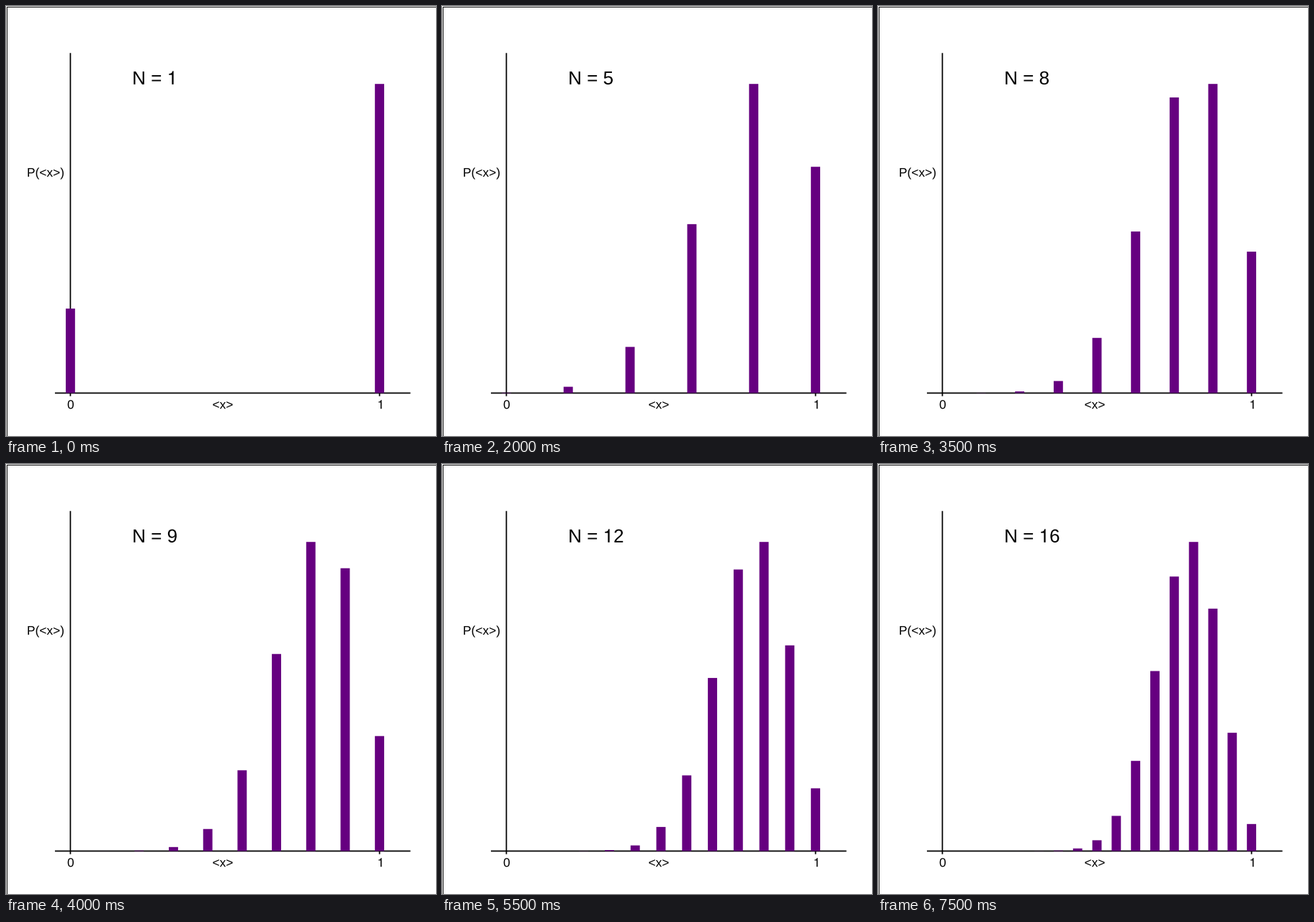
A matplotlib script for the animation above (8000 ms loop, 597 by 597 pixels).

```python
from math import comb, pi

import matplotlib.pyplot as plt
import numpy as np
from matplotlib.animation import FuncAnimation
from matplotlib.patches import PathPatch, Rectangle
from matplotlib.path import Path
from matplotlib.textpath import TextPath
from matplotlib.transforms import Affine2D

SIZE, DPI = 597, 64
STEPS, INTERVAL = 16, 500
P = pi / 4
X0, Y0, UNIT = 89.4, 537.4, 429.2
BAR_W = 0.03 * UNIT
PURPLE = "#660080"
BIG, SMALL = 26, 52 / 3

# Advance widths in em; digits share the default.
ADVANCE = {"N": 0.722, " ": 0.278, "=": 0.584, "P": 0.667, "(": 0.333,
           ")": 0.333, "<": 0.584, ">": 0.584, "x": 0.5}

# Footless "1".
ONE = Path(
    np.array([(259, 505), (259, 0), (347, 0), (347, 709), (289, 709),
              (258, 600), (238, 585), (102, 568), (102, 505), (259, 505)]) / 1000,
    [Path.MOVETO] + [Path.LINETO] * 4 + [Path.CURVE4] * 3
    + [Path.LINETO, Path.CLOSEPOLY])


def glyph(ch):
    if ch == "1":
        return ONE
    return TextPath((0, 0), ch, size=1, prop={"family": "Liberation Sans"})


def text_path(s, x, y, size):
    """Outline of s with its baseline starting at (x, y)."""
    verts, codes, pen = [], [], 0
    for ch in s:
        if ch != " ":
            g = glyph(ch)
            verts.append(g.vertices + (pen, 0))
            codes.append(g.codes)
        pen += ADVANCE.get(ch, 0.556)
    path = Path(np.concatenate(verts), np.concatenate(codes))
    return Affine2D().scale(size, -size).translate(x, y).transform_path(path)


def write(s, x, y, size):
    return ax.add_patch(PathPatch(text_path(s, x, y, size), fc="black", lw=0, zorder=3))


def line(xs, ys):
    ax.plot(xs, ys, color="black", lw=1.75 * 72 / DPI, zorder=1,
            solid_capstyle="butt", snap=False)


fig = plt.figure(figsize=(SIZE / DPI, SIZE / DPI), dpi=DPI, facecolor="white")
ax = fig.add_axes([0, 0, 1, 1])
ax.set(xlim=(0, SIZE), ylim=(SIZE, 0))
ax.axis("off")

ax.add_patch(Rectangle((0.5, 0.5), SIZE - 1, SIZE - 1, fill=False,
                       ec="black", lw=72 / DPI))

tick = Y0 + 0.01 * UNIT
line([X0 - 0.05 * UNIT, X0 + 1.1 * UNIT], [Y0, Y0])
line([X0, X0], [Y0 - 1.1 * UNIT, tick])
line([X0 + UNIT, X0 + UNIT], [Y0, tick])

write("P(<x>)", 29, 237, SMALL)
write("<x>", 286.5, 559.2, SMALL)
write("0", 85, 559.2, SMALL)
write("1", 515.5, 559.2, SMALL)
title = write("N = 1", 175.2, 108.8, BIG)

bars = [ax.add_patch(Rectangle((0, Y0), BAR_W, 0, fc=PURPLE, lw=0, snap=False, zorder=2))
        for _ in range(STEPS + 1)]


def update(i):
    n = i + 1
    probs = [comb(n, k) * P**k * (1 - P)**(n - k) for k in range(n + 1)]
    peak = max(probs)
    for k, bar in enumerate(bars):
        bar.set_visible(k <= n)
        if k <= n:
            bar.set_x(X0 + UNIT * k / n - BAR_W / 2)
            bar.set_height(-UNIT * probs[k] / peak)
    title.set_path(text_path(f"N = {n}", 175.2, 108.8, BIG))
    return [*bars, title]


anim = FuncAnimation(fig, update, frames=STEPS, interval=INTERVAL,
                     repeat=True, repeat_delay=0)
plt.show()
```
